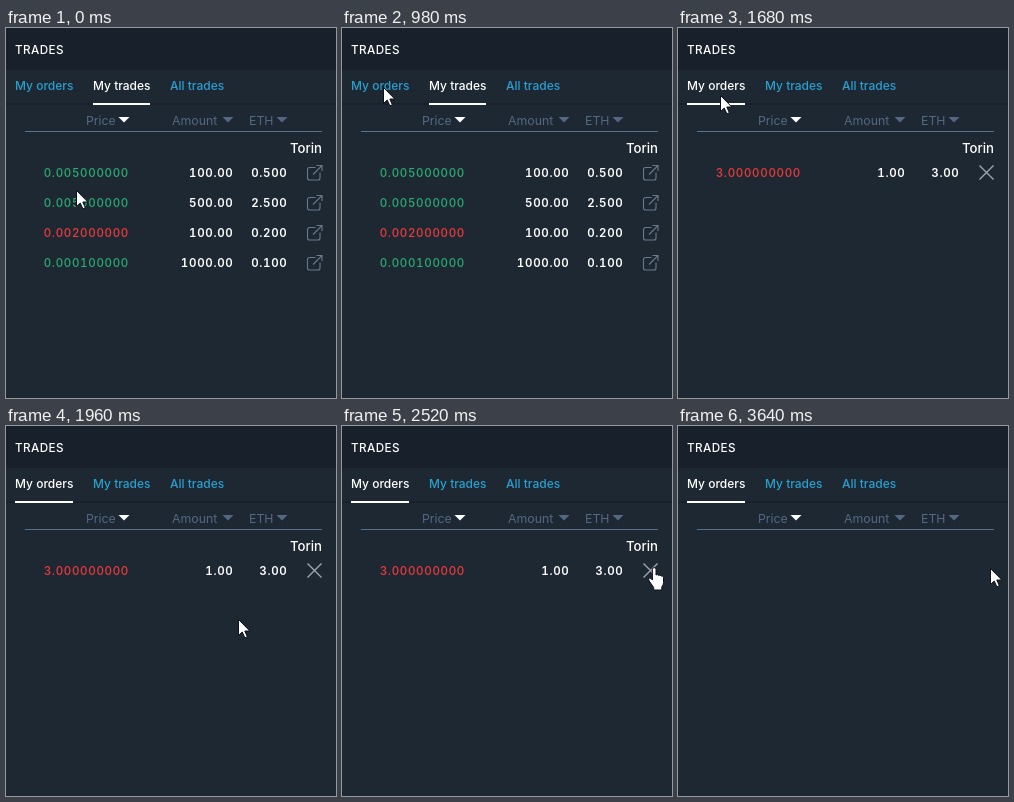
These frames come from a looping animation (330 by 370 pixels, 4.1 s). An HTML page:

```html
<!DOCTYPE html>
<html lang="en">
<head>
<meta charset="utf-8">
<title>Trades</title>
<style>
  html, body { margin: 0; width: 100%; height: 100%; overflow: hidden; background: #1e2833; }
  svg { display: block; width: 330px; height: 370px; cursor: default; }
  text { font: 12px Inter, "Open Sans", sans-serif; fill: #fff; }
  .title { font-size: 11.7px; font-weight: 500; letter-spacing: .4px; }
  .tab { fill: #2a9fcf; font-weight: 450; }
  .tab.on { fill: #fff; font-weight: 500; }
  .head { fill: #536884; font-size: 12.3px; }
  .owner { font-size: 13.2px; font-weight: 500; text-anchor: end; }
  .num { font-size: 11.5px; font-weight: 600; letter-spacing: .7px; font-variant-numeric: tabular-nums; text-anchor: end; }
  .buy, .sell { font-weight: 500; }
  .buy { fill: #2bab72; }
  .sell { fill: #ee3a3c; }
  .icon { fill: none; stroke: #68798b; stroke-width: 1.1; }
  .close { fill: none; stroke: #9aa7b4; stroke-width: 1.4; }
  .pointer { fill: #fff; stroke: #0c1118; stroke-width: 1; stroke-linejoin: round; }
</style>
</head>
<body>
<svg viewBox="0 0 330 370">
  <defs>
    <path id="link" class="icon" d="M8.5 2.5H2.5a2 2 0 0 0-2 2V13a2 2 0 0 0 2 2H11a2 2 0 0 0 2-2V7.5M6 9.5 15 .5M9.5.5H15V6"/>
    <path id="sort" d="M0 0H11L5.5 5.5Z"/>
  </defs>

  <rect width="330" height="370" fill="#1e2833"/>
  <rect width="330" height="42" fill="#17202b"/>
  <text class="title" x="9" y="26">TRADES</text>

  <rect y="75" width="330" height="2" fill="#17202b"/>
  <text class="tab" x="9" y="62">My orders</text>
  <text class="tab" x="87" y="62">My trades</text>
  <text class="tab" x="164" y="62">All trades</text>
  <rect id="underline" y="75" height="2" fill="#fff"/>

  <text class="head" x="80" y="97">Price</text>
  <text class="head" x="166" y="97">Amount</text>
  <text class="head" x="243" y="97">ETH</text>
  <use href="#sort" x="112.5" y="89" fill="#fff"/>
  <use href="#sort" x="216.5" y="89" fill="#536884"/>
  <use href="#sort" x="270.5" y="89" fill="#536884"/>
  <rect x="19" y="103" width="297" height="1" fill="#5b7089"/>

  <text id="owner" class="owner" x="316" y="125">Torin</text>
  <g id="trades"></g>
  <g id="orders">
    <path class="close" d="M301.5 137.5 315.5 151.5M315.5 137.5 301.5 151.5"/>
    <rect id="focus" x="301" y="137" width="15" height="15" fill="none" stroke="#3f86bd" stroke-width="1.3"/>
  </g>

  <path id="arrow" class="pointer" d="M.5.5V16.5L4.2 13 6.9 18.8 9.3 17.7 6.8 12H11.8Z"/>
  <path id="hand" class="pointer" d="M-1.6 1.4a1.8 1.8 0 0 1 3.6 0V7q1.5-1.2 2.6.4 1.6-1 2.5.5 2.4-.5 2.4 1.8V14.5q0 2.4-1.7 4.4V22H-.3V19.5L-4.8 13q-1.2-2.2.2-3 1.2-.5 3 2.1Z"/>
</svg>
<script>
const LOOP = 4100, SWITCH = 1260, GRAB = 2520, CLICK = 2800, REMOVED = 3640;
const $ = id => document.getElementById(id);
const show = (el, on) => el.setAttribute('visibility', on ? 'visible' : 'hidden');

// Pointer stops: time, x, y; each is held until the next
const stops = [
  [0, 70, 162], [420, 56, 112], [560, 41, 65], [700, 41, 63], [840, 41, 61],
  [980, 41, 59], [1680, 42, 67], [1820, 140, 189], [1960, 232, 193],
  [2100, 321, 166], [2240, 320, 151], [2380, 317, 145], [2520, 312, 142]
];

function row(y, side, price, amount, total) {
  const cell = (x, value, cls) => `<text class="num ${cls}" x="${x}" y="${y}">${value}</text>`;
  return cell(123, price, side) + cell(227.5, amount, '') + cell(281.5, total, '');
}

$('trades').innerHTML = [
  ['buy', '0.005000000', '100.00', '0.500'],
  ['buy', '0.005000000', '500.00', '2.500'],
  ['sell', '0.002000000', '100.00', '0.200'],
  ['buy', '0.000100000', '1000.00', '0.100']
].map((r, i) => row(149 + 30 * i, ...r) + `<use href="#link" x="301" y="${137 + 30 * i}"/>`).join('');
$('orders').insertAdjacentHTML('afterbegin', row(149, 'sell', '3.000000000', '1.00', '3.00'));

const tabs = document.querySelectorAll('.tab');

function draw(now) {
  const t = now % LOOP;
  const onOrders = t >= SWITCH, gone = t >= REMOVED;
  const grabbing = t >= GRAB && !gone;

  tabs.forEach((tab, i) => tab.classList.toggle('on', i === (onOrders ? 0 : 1)));
  $('underline').setAttribute('x', onOrders ? 9 : 87);
  $('underline').setAttribute('width', onOrders ? 58 : 57);

  show($('trades'), !onOrders);
  show($('orders'), onOrders && !gone);
  show($('focus'), t >= CLICK && !gone);
  show($('owner'), !gone);

  const [, x, y] = stops.findLast(s => s[0] <= t);
  for (const id of ['arrow', 'hand']) {
    $(id).setAttribute('transform', `translate(${x} ${y})`);
    show($(id), (id === 'hand') === grabbing);
  }
}

const start = performance.now();
function tick() {
  draw(performance.now() - start);
  requestAnimationFrame(tick);
}
tick();
</script>
</body>
</html>
```
